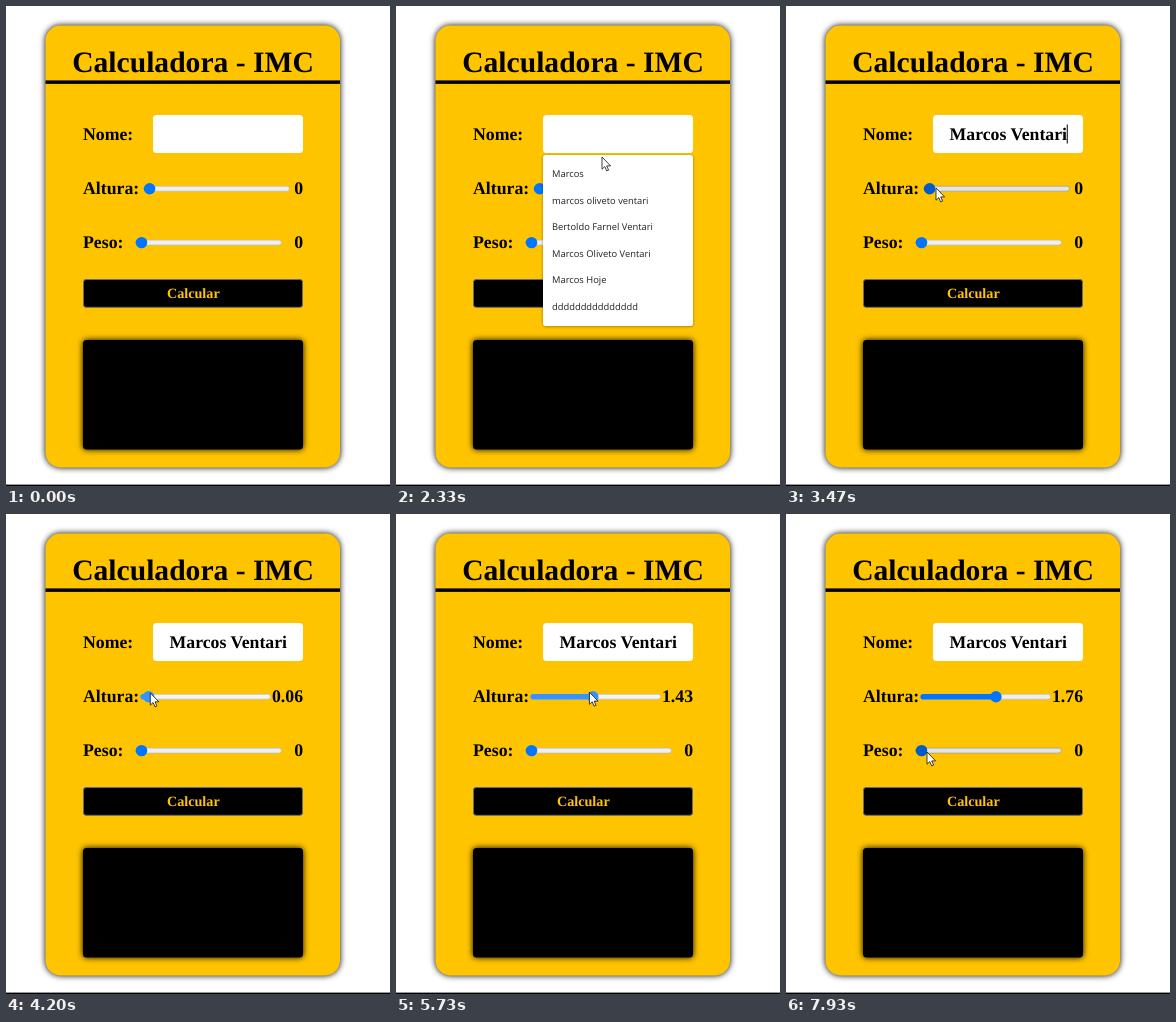
An HTML page that plays this animation: 384 px wide and 480 px high, repeating every 8000 ms.

```html
<!DOCTYPE html>
<html lang="pt-BR">
<head>
<meta charset="utf-8">
<title>Calculadora - IMC</title>
<style>
  html, body { margin: 0; width: 100%; height: 100%; overflow: hidden; background: #fff; }
  svg { display: block; width: 100vw; height: 100vh; }
  text { font: bold 17.76px "Liberation Serif", "Times New Roman", serif; text-rendering: geometricPrecision; white-space: pre; }
  .title { font-size: 29.6px; }
  .btn { font-size: 14.2px; fill: #ffc400; }
  .item { font: 9.35px "Open Sans", "Noto Sans", sans-serif; fill: #222; }
  .mid { text-anchor: middle; }
  .end { text-anchor: end; }
</style>
</head>
<body>
<svg viewBox="0 0 384 480">
  <defs>
    <filter id="blur" x="-20%" y="-20%" width="140%" height="140%"><feGaussianBlur stdDeviation="3"/></filter>
    <filter id="soft" x="-20%" y="-20%" width="140%" height="140%"><feGaussianBlur stdDeviation="1.4"/></filter>
  </defs>
  <rect width="384" height="480" fill="#fff"/>
  <rect y="478.6" width="384" height="1.4"/>
  <rect x="39.5" y="19.5" width="294.5" height="442" rx="15" filter="url(#blur)"/>
  <rect x="39.5" y="19.5" width="294.5" height="442" rx="15" fill="#ffc400"/>
  <text class="title mid" x="187" y="66">Calculadora - IMC</text>
  <rect x="39.5" y="74.4" width="294.5" height="3.5"/>

  <text x="77" y="134">Nome:</text>
  <rect x="147" y="109" width="150" height="38" rx="3.5" fill="#fff"/>
  <text id="name" class="mid" x="222.3" y="134"></text>
  <rect id="caret" y="118.5" width="1" height="19"/>

  <text x="77" y="188">Altura:</text>
  <text x="77" y="242">Peso:</text>
  <g id="sliders"></g>

  <rect x="77.5" y="273.5" width="219" height="27.8" rx="2.5" stroke="#6b6b6b"/>
  <text class="btn mid" x="187.3" y="291.6">Calcular</text>
  <rect x="77" y="334" width="220" height="109.5" rx="3.5" filter="url(#blur)"/>
  <rect x="77" y="334" width="220" height="109.5" rx="3.5"/>

  <g id="list">
    <rect id="listShade" x="147" y="149.5" width="150" rx="2.5" opacity=".4" filter="url(#soft)"/>
    <rect id="listBox" x="147" y="149" width="150" rx="2.5" fill="#fff"/>
    <g id="items"></g>
  </g>
  <g id="cursor">
    <path id="arrow" d="M0 0V12.2L2.8 9.6L4.7 13.9L6.6 13.1L4.7 8.9H8.6Z" fill="#fff" stroke="#111" stroke-width=".8"/>
    <path id="beam" d="M-2.5 -6H2.5M0 -6V6M-2.5 6H2.5" stroke="#222" stroke-width=".9"/>
  </g>
</svg>
<script>
const LOOP = 8000;
const NAME = "Marcos Ventari";
const SAVED = ["Marcos", "marcos oliveto ventari", "Bertoldo Farnel Ventari",
  "Marcos Oliveto Ventari", "Marcos Hoje", "ddddddddddddddd"];
const FOCUS = 1780, OPEN = 2130, TYPE_FROM = 2450, TYPE_TO = 3130;
const PRESS = 3960, RELEASE = 7050;

// [time, x, y]
const PATH = [[930, 112, 62], [1070, 164, 104], [1500, 203, 128], [2150, 205, 131],
  [2330, 206, 151], [2720, 342, 166], [3000, 330, 170], [3130, 300, 176],
  [3470, 150, 182], [3700, 143, 180], [4070, 142, 179], [5000, 184.5, 178],
  [6600, 205, 178.5], [6900, 209, 178.5], [7080, 209, 180], [7330, 182, 272],
  [7470, 162, 260], [7750, 144, 240], [7930, 141, 238]];
// [time, metres]
const HEIGHT = [[4070, 0], [5000, 1.1], [6000, 1.5], [6600, 1.63], [6900, 1.76]];

const $ = id => document.getElementById(id);
const attr = (el, o) => { for (const k in o) el.setAttribute(k, o[k]); };
const show = (el, on) => attr(el, { visibility: on ? "visible" : "hidden" });

function add(tag, parent, o = {}) {
  const el = document.createElementNS("http://www.w3.org/2000/svg", tag);
  attr(el, o);
  parent.append(el);
  return el;
}

function at(keys, t) {
  if (t <= keys[0][0]) return keys[0].slice(1);
  const i = keys.findIndex(k => k[0] > t);
  if (i < 0) return keys[keys.length - 1].slice(1);
  const a = keys[i - 1], b = keys[i];
  const u = (t - a[0]) / (b[0] - a[0]), e = u * u * (3 - 2 * u);
  return a.slice(1).map((v, n) => v + (b[n + 1] - v) * e);
}

function makeSlider(left, y, max) {
  const g = $("sliders");
  const bar = add("rect", g, { y: y - 2.5, height: 5, rx: 2.5, "stroke-width": .7 });
  const fill = add("rect", g, { y: y - 2.8, height: 5.6, rx: 2.8 });
  const thumb = add("circle", g, { cy: y, r: 5.7 });
  const label = add("text", g, { class: "end", x: 297, y: y + 5.4 });
  return (value, mx, my, pressed) => {
    const str = String(value);
    const right = 297 - 17.76 * (str.length > 1 ? str.length * .5 - .25 : .5);
    const w = Math.min(146, right - left - 2);
    const x = (left + right - w) / 2;
    const cx = x + 5.9 + value / max * (w - 11.8);
    const over = Math.abs(my - y) < 6 && mx > x && mx < x + w;
    const near = over && Math.abs(mx - cx) < 6.7;
    const blue = pressed ? "#3793ff" : near ? "#005cc8" : "#0075ff";
    attr(bar, { x: x + .3, width: w - .6,
      fill: pressed ? "#f5f5f5" : over ? "#e5e5e5" : "#efefef",
      stroke: over && !pressed ? "#9b9b9b" : "#b8b8b8" });
    attr(fill, { x, width: cx - x, fill: blue });
    attr(thumb, { cx, fill: blue });
    label.textContent = str;
  };
}

const setHeight = makeSlider(133.4, 182.7, 3);
const setWeight = makeSlider(117.2, 236.6, 300);
const rows = SAVED.map((_, i) => add("text", $("items"), { class: "item", x: 156, y: 171.4 + i * 26.5 }));

function drawField(t) {
  const u = (t - TYPE_FROM) / (TYPE_TO - TYPE_FROM);
  const typed = NAME.slice(0, Math.max(0, Math.ceil(u * NAME.length)));
  const name = $("name");
  name.textContent = typed;
  const half = typed ? name.getComputedTextLength() / 2 : 0;
  const since = t < TYPE_FROM ? t - FOCUS : t - Math.min(t, TYPE_TO);
  attr($("caret"), { x: 222 + half });
  show($("caret"), t >= FOCUS && t < PRESS && since % 1000 < 500);

  const hits = SAVED.filter(s => s.toLowerCase().startsWith(typed.toLowerCase()) && (s !== typed));
  const open = t >= OPEN && t < PRESS && hits.length > 0;
  show($("list"), open);
  const height = 12 + hits.length * 26.5;
  attr($("listBox"), { height });
  attr($("listShade"), { height });
  rows.forEach((r, i) => r.textContent = hits[i] || "");
  return open;
}

function draw(t) {
  const [x, y] = at(PATH, t);
  drawField(t);
  const height = Math.round(at(HEIGHT, t)[0] * 100) / 100;
  setHeight(height, x, y, t >= PRESS && t < RELEASE);
  setWeight(0, x, y, false);

  const visible = t >= PATH[0][0];
  const inField = x > 147 && x < 297 && y > 109 && y < 147;
  attr($("cursor"), { transform: `translate(${x} ${y})` });
  show($("arrow"), visible && !inField);
  show($("beam"), visible && inField);
}

function tick() {
  draw(performance.now() % LOOP);
  requestAnimationFrame(tick);
}
tick();
</script>
</body>
</html>
```
